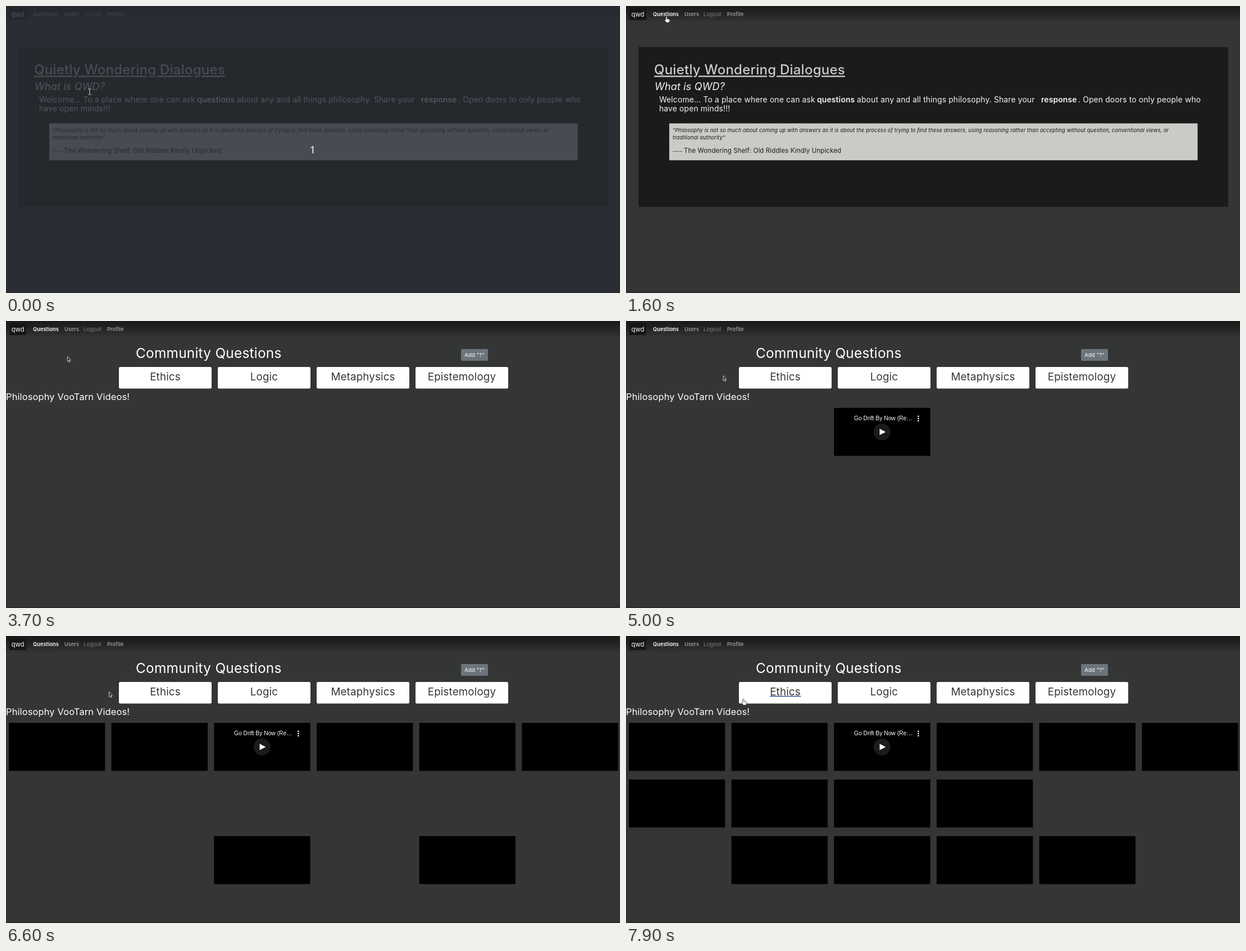
Recreate the animation shown at these times as an HTML page. Size 1093x512 px, loop 8 s.

```html
<!DOCTYPE html>
<html lang="en">
<head>
<meta charset="utf-8">
<title>Community Questions</title>
<style>
  html, body { margin: 0; width: 100%; height: 100%; overflow: hidden; background: #343635; }
  svg { display: block; width: 100%; height: 100%; }
  text { font-family: Inter, sans-serif; letter-spacing: .01em; white-space: pre; }
  .b { font-weight: 600; }
  .i { font-style: italic; }
  .nav text { font-size: 9.2px; fill: #9a9b9a; }
  .lead text { font-size: 13.9px; fill: #f4f4f2; }
  .quote text { font-size: 9.35px; fill: #1a1c1b; }
  .cards text { font-size: 18.7px; fill: #343638; text-anchor: middle; }
</style>
</head>
<body>
<svg viewBox="0 0 1093 512">
  <defs>
    <linearGradient id="shade" x2="0" y2="1">
      <stop offset="0" stop-color="#191b1a"/>
      <stop offset=".45" stop-color="#222423"/>
      <stop offset="1" stop-color="#343635"/>
    </linearGradient>
  </defs>
  <rect width="1093" height="512" fill="#343635"/>
  <rect y="510" width="1093" height="2" fill="#2a2c2b"/>
  <rect width="1093" height="30" fill="url(#shade)"/>

  <g class="nav">
    <rect x="6" y="4" width="30" height="21" fill="#151716"/>
    <text x="9.5" y="18.7" style="font-size:11.4px;fill:#f4f4f2;letter-spacing:0">qwd</text>
    <text id="link" class="b" x="48" y="17.6">Questions</text>
    <text class="b" x="104" y="17.6" style="letter-spacing:0">Users</text>
    <text x="138" y="17.6" style="font-size:9.5px;fill:#7f817f">Logout</text>
    <text class="b" x="180" y="17.6">Profile</text>
  </g>

  <g id="home">
    <rect x="22.3" y="73.3" width="1049.7" height="285" fill="#1a1c1b"/>
    <text x="50" y="122.3" font-size="24" font-weight="500" fill="#c9cac7"
      style="text-decoration:underline">Quietly Wondering Dialogues</text>
    <text class="i" x="51" y="150" font-size="18" fill="#f4f4f2">What is QWD?</text>
    <g class="lead">
      <text x="59" y="171.8">Welcome... To a place where one can ask</text>
      <text class="b" x="340" y="171.8">questions</text>
      <text x="411" y="171.8">about any and all things philosophy. Share your</text>
      <text class="b" x="739" y="171.8">response</text>
      <text x="805" y="171.8">. Open doors to only people who</text>
      <text x="59" y="187.8">have open minds!!!</text>
    </g>
    <rect x="77" y="209.4" width="940.5" height="65.8" fill="#cacbc7"/>
    <g class="quote">
      <text class="i" x="83" y="224.6">"Philosophy is not so much about coming up with answers as it is about the process of trying to find these answers, using reasoning rather than accepting without question, conventional views, or</text>
      <text class="i" x="83" y="238.4">traditional authority"</text>
      <text x="83" y="262.2" style="letter-spacing:0">----</text>
      <text x="103" y="262.2" style="font-size:11.5px">The Wondering Shelf: Old Riddles Kindly Unpicked</text>
    </g>
  </g>

  <g id="board">
    <text x="231" y="66.4" font-size="24.4" fill="#fffffd">Community Questions</text>
    <rect x="810" y="50" width="48" height="21" rx="2.5" fill="#6c757d"/>
    <text x="834" y="63.6" font-size="9.6" fill="#fffffd" text-anchor="middle">Add "?"</text>
    <g id="cards" class="cards"></g>
    <text x="0" y="140.6" font-size="16.4" fill="#fffffd">Philosophy VooTarn Videos!</text>
    <text id="loading" x="547" y="159.2" font-size="9.5" fill="#f4f4f2" text-anchor="middle">Loading vootarn videos ...</text>
    <rect id="underline" x="256" y="106.8" width="55.5" height="1.5" fill="#24508f"/>
    <g id="videos"></g>
    <text id="clip" x="406" y="177" font-size="10.3" fill="#fff"
      style="font-family:'Liberation Sans',sans-serif;letter-spacing:0">Go Drift By Now (Re…</text>
    <g id="player" fill="#fff">
      <circle cx="455.7" cy="198" r="15" fill="#1b1b19"/>
      <path d="M451.5 192.3L462.3 197.9L451.5 203.5Z"/>
      <circle cx="520.4" cy="170" r="1.35"/>
      <circle cx="520.4" cy="174" r="1.35"/>
      <circle cx="520.4" cy="178" r="1.35"/>
    </g>
  </g>

  <g id="intro">
    <rect width="1093" height="512" fill="#282c34" fill-opacity=".8"/>
    <text x="546" y="262.5" font-size="18" fill="#fff" text-anchor="middle"
      style="font-family:'Noto Sans',sans-serif;letter-spacing:0">1</text>
  </g>

  <g id="cursor">
    <path id="beam" d="M-2.5 -5H-.6L0 -4.4L.6 -5H2.5M0 -4.4V4.4M-2.5 5H-.6L0 4.4L.6 5H2.5" fill="none" stroke="#d0d0d0"/>
    <path id="arrow" d="M.5 .5V9.2L2.4 7.5L3.8 10.6L5.2 10L3.8 7H6.3Z" fill="#222" stroke="#f4f4f2" stroke-width=".8"/>
    <path id="hand" d="M-1.1 1Q-1.1 0 0 0T1.1 1V4.4L5 5.2Q6 5.5 6 6.6L5.4 9.8Q5.2 10.9 4.2 10.9H.4Q-.4 10.9 -.9 10.2L-3 7.2Q-3.4 6.2 -2.4 5.8L-1.1 6.8Z"
      fill="#fffffd" stroke="#222" stroke-width=".7"/>
  </g>
</svg>
<script>
const LOOP = 8000, STEP = 100, PAGE_AT = 1900;
const NS = 'http://www.w3.org/2000/svg';
const $ = id => document.getElementById(id);
const show = (node, on) => { node.style.display = on ? '' : 'none'; };

function add(parent, tag, attrs, label = '') {
  const node = document.createElementNS(NS, tag);
  for (const key in attrs) node.setAttribute(key, attrs[key]);
  node.textContent = label;
  return $(parent).appendChild(node);
}

['Ethics', 'Logic', 'Metaphysics', 'Epistemology'].forEach((name, k) => {
  const x = Math.round(201.3 + 175.8 * k);
  add('cards', 'rect', { x, y: 82, width: 165, height: 38.5, rx: 2.5, fill: '#fffffd' });
  add('cards', 'text', { x: x + 82.5, y: 105.6 }, name);
});

// Load time of each video, by row and column; 0 leaves the cell empty.
const loads = [
  [6100, 6600, 4600, 5100, 5800, 5600],
  [7400, 7200, 6900, 7800, 0, 0],
  [0, 7600, 5900, 6700, 6300, 0]
];
const videos = loads.flatMap((row, r) => row.map((at, c) => at && {
  at,
  node: add('videos', 'rect', { x: 5 + 182.67 * c, y: 155 + 101 * r, width: 171.3, height: 85.6 })
})).filter(Boolean);

// Pointer path: time, x, y
const path = [
  [0, 149, 153], [300, 149, 153], [400, 145, 149], [500, 145, 149],
  [1300, 77, 28], [1400, 77, 28], [1600, 72, 18.5], [2100, 72, 18.5],
  [2200, 72, 20], [2300, 72, 20], [2500, 73, 21], [2800, 73, 21],
  [2900, 74, 23], [3000, 74, 23], [3400, 100, 58], [3600, 100, 58],
  [4400, 172, 97], [5400, 173, 97], [5600, 173.5, 97.5], [6000, 173.5, 97.5],
  [6400, 177, 97.5], [6500, 177, 97.5], [6900, 201, 104], [7100, 202, 104],
  [7300, 202, 105], [7900, 209, 112.3]
];

function pointer(t) {
  const n = path.findIndex(p => p[0] > t);
  if (n < 0) return path[path.length - 1].slice(1);
  const [t0, x0, y0] = path[n - 1], [t1, x1, y1] = path[n];
  const k = (t - t0) / (t1 - t0);
  return [x0 + (x1 - x0) * k, y0 + (y1 - y0) * k];
}

function draw(time) {
  const t = Math.floor(time % LOOP / STEP) * STEP;
  const [x, y] = pointer(t);
  const board = t >= PAGE_AT;
  const onLink = y < 31 && x < 99;
  const onCard = board && x >= 200;
  const onText = !board && y > 100;

  show($('home'), !board);
  show($('board'), board);
  show($('intro'), t < 400);
  show($('loading'), t < 2500);
  show($('clip'), t >= 4800);
  show($('player'), t >= 4900);
  show($('underline'), onCard);
  videos.forEach(v => show(v.node, t >= v.at));

  $('link').style.fill = board || onLink ? '#fffffd' : '';
  $('cursor').setAttribute('transform', `translate(${x} ${y})`);
  show($('beam'), onText);
  show($('hand'), onLink || onCard);
  show($('arrow'), !onText && !onLink && !onCard);
}

const start = performance.now();
function tick() {
  draw(performance.now() - start);
  requestAnimationFrame(tick);
}
tick();
</script>
</body>
</html>
```
